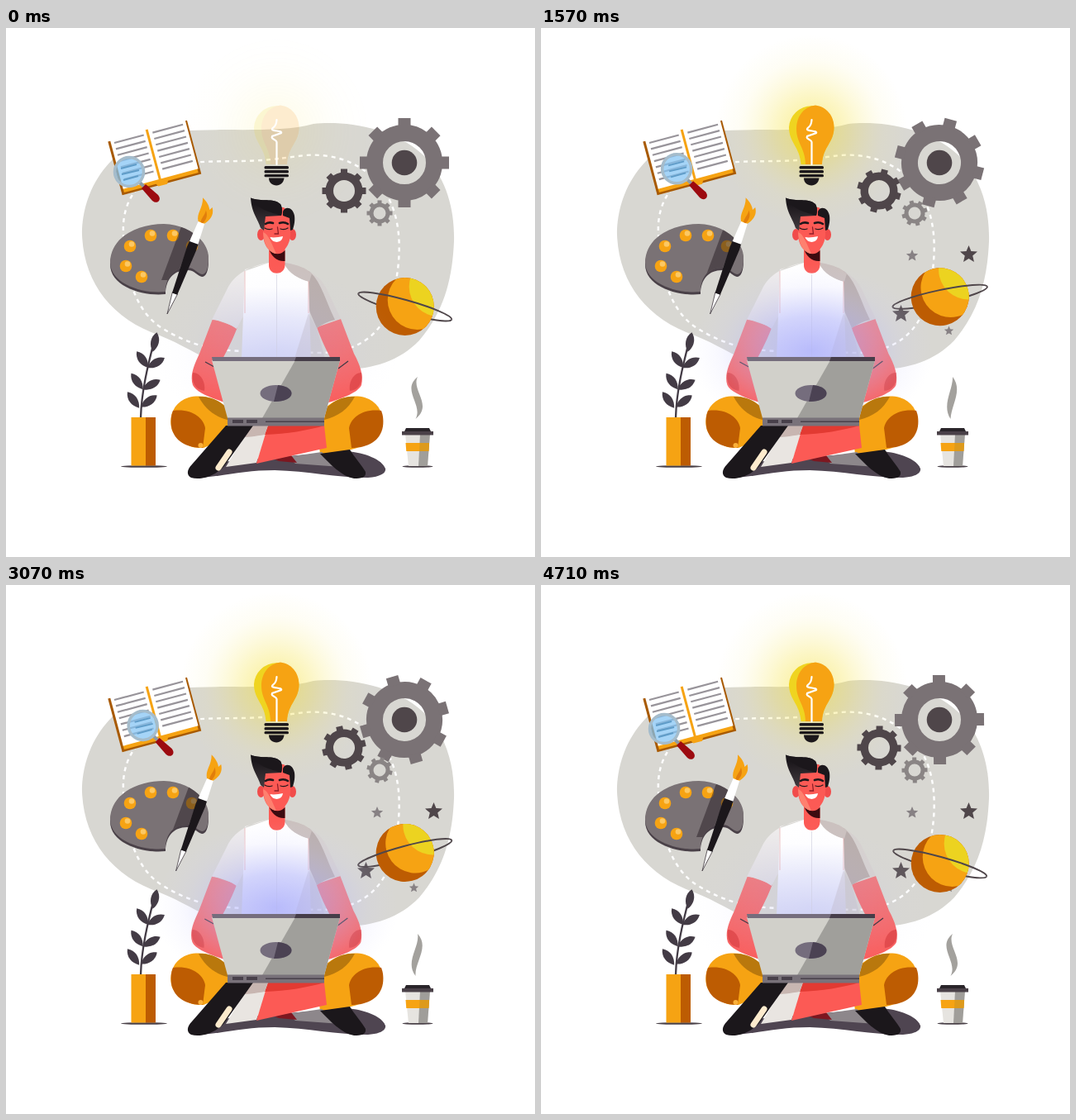
These frames come from a looping animation (640 by 640 pixels, 4.78 s). An HTML page:

```html
<!DOCTYPE html>
<html lang="en">
<head>
<meta charset="utf-8">
<title>Creative work</title>
<style>
html, body { margin: 0; width: 100%; height: 100%; overflow: hidden; background: #fff; }
svg { display: block; width: 100vw; height: 100vh; }
</style>
</head>
<body>
<svg viewBox="0 0 640 640">
<defs>
  <radialGradient id="warm">
    <stop offset="0" stop-color="#f5df2e" stop-opacity=".54"/>
    <stop offset=".4" stop-color="#f5e13c" stop-opacity=".27"/>
    <stop offset=".75" stop-color="#f8ea80" stop-opacity=".08"/>
    <stop offset="1" stop-color="#f8ea80" stop-opacity="0"/>
  </radialGradient>
  <radialGradient id="cool">
    <stop offset="0" stop-color="#a2a5ff" stop-opacity=".62"/>
    <stop offset=".4" stop-color="#b0b3ff" stop-opacity=".45"/>
    <stop offset=".75" stop-color="#c8c8fc" stop-opacity=".13"/>
    <stop offset="1" stop-color="#d8d8ff" stop-opacity="0"/>
  </radialGradient>
  <linearGradient id="shirt" x1="0" y1="0" x2="0" y2="1">
    <stop offset=".25" stop-color="#fff"/>
    <stop offset="1" stop-color="#d9dbf4"/>
  </linearGradient>
  <linearGradient id="sleeve" x1="0" y1="0" x2="0" y2="1">
    <stop offset="0" stop-color="#f2efee"/>
    <stop offset="1" stop-color="#dddbe0"/>
  </linearGradient>
  <linearGradient id="skin" x1="0" y1="0" x2="0" y2="1">
    <stop offset="0" stop-color="#ef7a7d"/>
    <stop offset="1" stop-color="#fb5a58"/>
  </linearGradient>
  <linearGradient id="quiff" x1="0" y1="0" x2="0" y2="1">
    <stop offset=".2" stop-color="#1b171b"/>
    <stop offset="1" stop-color="#423b40"/>
  </linearGradient>
  <clipPath id="paletteClip"><path d="M126 283C127 252 160 237 191 237C223 238 246 259 245 279C245 291 242 298 237 298C231 297 229 290 219 290C203 290 193 301 193 319C166 322 126 310 126 283Z"/></clipPath>
  <clipPath id="planetClip"><circle r="35"/></clipPath>
</defs>

<path fill="#d8d7d2" d="M92 250C92 190 132 132 205 125C265 120 328 128 372 116C410 112 468 120 504 153C534 181 543 222 542 258C540 306 529 344 500 378C472 407 432 416 392 412L290 414C246 408 222 386 186 372C128 352 94 308 92 250Z"/>
<path fill="none" stroke="#fff" stroke-width="2.400" stroke-dasharray="5 5" d="M330 158C285 164 240 158 208 166C158 178 140 212 142 248C144 300 157 342 187 362C222 384 250 390 290 391L382 393C424 392 453 372 464 338C474 305 480 266 472 231C460 179 415 150 362 154Z"/>

<g id="lamp">
  <circle cx="327" cy="124" r="116" fill="url(#warm)"/>
  <path fill="#efd420" d="M300 120A27.300 27.300 0 0 1 354.500 120C354.500 139 341 143 340 165H314.500C313 143 300 139 300 120Z"/>
  <path fill="#f6a313" d="M332 93.500C345 95 354.500 106 354.500 120C354.500 139 341 143 340 165H320C320 146 309 139 309 122C309 107 318 95 332 93.500Z"/>
</g>
<path fill="none" stroke="#fff" stroke-width="2.200" stroke-linecap="round" d="M327.500 165V138C327 134 320 135 322 131L333 127C335 124 321 125 322 122C323 119 327 121 327.500 111"/>
<g fill="#1c181b">
  <rect x="312.500" y="167" width="29.500" height="3.500" rx="1.500"/>
  <rect x="312.500" y="172" width="29.500" height="3.500" rx="1.500"/>
  <rect x="312.500" y="177" width="29.500" height="3.200" rx="1.500"/>
  <path d="M318 181.500H336.500C336 187 332 190.500 327.300 190.500C322 190.500 318 187 318 181.500Z"/>
</g>

<g id="gears"></g>

<g transform="translate(125 136) rotate(-15)">
  <path fill="#a85a02" d="M-2 1H97V68H-2Z"/>
  <path fill="#f6a313" d="M1 60H94V65.500H56L54 69H43L41 65.500H1Z"/>
  <path fill="#fff" d="M1 0H95V61H1Z"/>
  <path fill="#f6a313" d="M45.500 -1H48.500V62H45.500Z"/>
  <g id="lines" stroke="#98949a" stroke-width="2.200"></g>
</g>
<g id="lens">
  <path stroke="#8c9aa5" stroke-width="4" d="M13 13L18 18"/>
  <path fill="#9c0a10" d="M15 20L20 15L35 28C40 34 34 40 28 35Z"/>
  <circle r="17.500" fill="#83c4f4" fill-opacity=".72" stroke="#a5bccb" stroke-width="3.500"/>
  <path stroke="#5f9cc8" stroke-width="1.900" d="M-10 -4L9 -9M-9 3L12 -2M-7 10L11 5"/>
</g>

<path fill="#4a4148" transform="translate(0 3)" d="M126 283C127 252 160 237 191 237C223 238 246 259 245 279C245 291 242 298 237 298C231 297 229 290 219 290C203 290 193 301 193 319C166 322 126 310 126 283Z"/>
<g clip-path="url(#paletteClip)">
  <path fill="#7a7275" d="M120 230H250V330H120Z"/>
  <g id="paint"></g>
  <path id="shade" fill="#2b2128" fill-opacity=".52" d="M214 235H231L205 305H188Z"/>
</g>
<g id="brush">
  <g transform="translate(195 346) rotate(20.500)">
    <path fill="#fff" stroke="#3a3339" stroke-width=".7" d="M0 0L-3.300 -27H3.300Z"/>
    <path fill="#1b171b" d="M-3.300 -26L-6 -85L-5.500 -93H5.500L6 -85L3.300 -26Z"/>
    <path fill="#fff" d="M-5.500 -92L-4 -119H4L5.500 -92Z"/>
    <path fill="#f6a313" d="M-4 -118C-10 -127 -4 -135 -9 -147C-2 -144 2 -140 4 -136L6 -140C12 -131 8 -124 4 -118Z"/>
    <path fill="#e17e0c" d="M-1 -118C-2 -124 1 -128 0 -134C5 -128 4 -123 2 -118Z"/>
  </g>
</g>

<g id="stars"></g>
<g id="planet">
  <path class="ring" fill="none" stroke="#4f464a" stroke-width="2" d="M-58.500 0A58.500 8 0 0 0 58.500 0"/>
  <g id="globe" clip-path="url(#planetClip)">
    <circle r="36" fill="#bd5c02"/>
    <circle cx="15" cy="-8" r="36" fill="#f6a313"/>
    <circle cx="41" cy="-24" r="36" fill="#ecd320"/>
  </g>
  <path class="ring" fill="none" stroke="#4f464a" stroke-width="2" d="M-58.500 0A58.500 8 0 0 1 58.500 0"/>
</g>

<ellipse cx="167" cy="530.500" rx="28" ry="1.300" fill="#4a4148"/>
<path fill="#f6a313" d="M151.500 471H169V529.500H151.500Z"/>
<path fill="#bd5c02" d="M169 471H181V529.500H169Z"/>
<path fill="none" stroke="#433b45" stroke-width="2.300" d="M163 471C164 440 171 410 180 376"/>
<g id="leaves" fill="#433b45"></g>

<path id="steam" fill="#a3a19d"/>
<ellipse cx="498" cy="530.500" rx="18.500" ry="1.300" fill="#4a4148"/>
<path fill="#e6e4e0" d="M483 491H513L510 530H487Z"/>
<path fill="#a09e9a" d="M501 491H513L510 530H499Z"/>
<path fill="#f6a313" d="M483.500 502H512L511.300 512H484.300Z"/>
<path fill="#dd9a1c" d="M500.500 502H512L511.300 512H500Z"/>
<path fill="#2a252a" d="M484 484H512L514 488H482Z"/>
<path fill="#4a4148" d="M479 488H517V492.500H479Z"/>

<path fill="#4f4551" d="M230 545C270 541 290 535 325 535C365 536 400 544 438 544C454 543 460 538 459 533C455 522 435 514 412 512L260 525Z"/>
<g id="arms">
  <path fill="url(#skin)" d="M250 352L280 362C272 383 263 398 256 412L270 442L268 454C249 448 230 441 226 432C222 420 228 407 234 394Z"/>
  <path fill="url(#skin)" d="M405 352L376 362C383 382 392 398 399 412L386 442L388 454C407 448 426 441 430 432C433 420 428 407 421 394Z"/>
  <path fill="#e34748" d="M226 417C234 416 242 427 240 439C231 438 224 431 226 417ZM430 417C422 416 414 427 416 439C426 438 432 431 430 417Z"/>
  <path fill="none" stroke="#3a3038" stroke-width="1.300" d="M241 404L252 410M414 403L402 412"/>
</g>
<path fill="url(#sleeve)" d="M318 284C293 288 276 299 268 315L249 353C259 353 271 358 279 364L289 345V292Z"/>
<path fill="#d6d1cf" d="M337 284C360 287 380 300 387 314L405 352C395 353 384 357 376 363L365 340Z"/>
<path fill="#b9aeac" d="M366 294C380 304 386 328 398 353C389 355 382 359 376 363L366 340Z"/>
<path fill="url(#shirt)" d="M318 284H336C342 297 355 304 366 306L369 400H285L289 294Z"/>
<path fill="#cbc1bf" d="M337 284C352 286 362 290 370 297L367 307C355 304 342 297 336 284Z"/>
<path fill="none" stroke="#e6a9a9" stroke-width=".7" d="M289 294V345M366 306V345"/>
<path fill="none" stroke="#d9d8e4" stroke-width=".8" d="M327.500 298V398"/>
<path fill="#c9c3cc" fill-opacity=".5" d="M366 345L376 363L386 400H349Z"/>

<path fill="#fc5a55" d="M318 265H337.500V287C337 300 318 300 318 287Z"/>
<path fill="#3c0b10" d="M318 267C324 275 332 275 337.500 269V282C329 283 321 277 318 267Z"/>
<ellipse cx="308.500" cy="250" rx="4.500" ry="7" fill="#f14c4b"/>
<ellipse cx="346.500" cy="250" rx="4.500" ry="7" fill="#f14c4b"/>
<path fill="#fc5a55" d="M310 225L331 217H336L345 225L344 251C343 265 334 273 327 273C319 272 312 264 311 251Z"/>
<path fill="#ff8d78" fill-opacity=".75" d="M311 247C317 249 320 258 327 273C319 272 312 264 311 247Z"/>
<path fill="url(#quiff)" d="M296 205.500C309 211 323 205 332 213C335 218 334 224 333 227L314 228L312 245L308 242C305 231 297 224 296 205.500Z"/>
<path fill="#1b171b" d="M296 205.500C309 211 323 205 332 213C335 218 334 224 333 227C321 223 306 221 296 205.500ZM335 222C338 215 347 217 349 227C350 235 348 240 347 244L344 245L343 230L335 227Z"/>
<g fill="none" stroke="#1f171b" stroke-linecap="round">
  <path stroke-width="2.600" d="M314 237C317 235 320 235 323 236M331 236C334 235 338 235 341 237"/>
  <path stroke-width="1.300" d="M313 242C316 244 319 244 322 243M332 243C335 244 338 244 341 242"/>
  <path stroke="#8f1e28" stroke-width="1.300" d="M328.500 241L329.500 249H325"/>
</g>
<path fill="#fff" d="M319.500 253C324 254 330 253 335 252C334 261 322 261 319.500 253Z"/>
<ellipse id="lapGlow" cx="327" cy="390" rx="148" ry="104" fill="url(#cool)"/>

<path fill="#f6a313" d="M268 460C254 447 236 443 221 447C202 453 196 471 201 487C209 503 225 509 239 508L300 482Z"/>
<path fill="#bd5c02" d="M202 463C225 460 239 472 241 484L238 508C219 508 203 500 200 482C199 474 200 468 202 463Z"/>
<path fill="#b9780d" d="M233 446C249 445 259 452 268 460V474C252 470 241 461 233 446Z"/>
<path fill="#f6a313" d="M386 460C400 447 419 443 434 447C453 453 459 471 454 487C445 505 414 514 380 515L376 482Z"/>
<path fill="#bd5c02" d="M454 463C431 460 417 472 415 484L418 508C437 508 453 500 456 482C457 474 456 468 454 463Z"/>
<path fill="#b9780d" d="M422 446C406 445 396 452 387 460L385 474C402 470 414 461 422 446Z"/>
<circle cx="235.500" cy="505" r="3" fill="#fbb13a"/>
<path fill="#8d878b" d="M340 519L382 513L405 531L350 527Z"/>
<path fill="#7d1720" d="M325 522L345 517L352 526L330 524Z"/>
<path fill="#1b171b" d="M380 515L416 510C422 520 430 528 435 537C436 544 430 545 421 545C405 542 393 528 380 515Z"/>
<path fill="#e9e5e1" d="M296 481H319L303 526L266 531Z"/>
<path fill="#fc5a55" d="M317 481H385L388 508L303 527Z"/>
<path fill="#e23a32" d="M317 481H385C365 487 340 491 313 492Z"/>
<path fill="#c8b6b1" d="M293 481H317L313 492C302 494 290 495 281 496Z"/>
<path fill="#1b171b" d="M266 481H299L264 530C252 543 235 547 224 544C217 540 220 533 225 528Z"/>
<path stroke="#fdebcd" stroke-width="7" stroke-linecap="round" d="M270 513L257 532"/>

<path fill="#d1d0ca" d="M249 402H404L385 472H268Z"/>
<path fill="#a09f9b" d="M350 402H404L385 472H310Z"/>
<ellipse cx="326.500" cy="442" rx="19" ry="10" fill="#756d7d"/>
<path fill="#4b4253" d="M329 432C339 433 345.500 437 345.500 442C345.500 448 337 452 324 452Z"/>
<path fill="#756d7d" d="M249 398H404V403H250Z"/>
<path fill="#463d49" d="M351 398H404V403H349Z"/>
<path fill="#79727a" d="M268 471.500H385V481.500H268Z"/>
<path fill="#48404a" d="M274 474H287V478H274ZM291 474H304V478H291ZM314 475.500H385V477H314Z"/>
</svg>

<script>
const LOOP = 4780;
const $ = id => document.getElementById(id);
const range = (n, f) => Array.from({ length: n }, (_, i) => f(i)).join('');

const gears = [
  { x: 482, y: 163, body: 46, hole: 26, tip: 54, w: 15, color: '#7a7275', turn: 45 },
  { x: 409, y: 197, body: 22.5, hole: 13, tip: 26.5, w: 8, color: '#4f464a', turn: -90 },
  { x: 452, y: 224, body: 12.5, hole: 7.5, tip: 15.5, w: 5, color: '#8a8585', turn: 90 }
];
$('gears').innerHTML = gears.map(g => `<g fill="${g.color}">
  <circle r="${(g.body + g.hole) / 2}" fill="none" stroke="${g.color}" stroke-width="${g.body - g.hole}"/>
  ${range(8, i => `<rect x="${-g.w / 2}" y="${-g.tip}" width="${g.w}" height="${g.tip - g.body + 3}" transform="rotate(${i * 45})"/>`)}
  </g>`).join('') + '<circle cx="482" cy="163" r="15.300" fill="#4f464a"/>';

$('lines').innerHTML = range(7, i => {
  const y = 4.5 + i * 7.6;
  return `<path d="M5 ${y}H42M53 ${y}H91"/>`;
});

const dots = [[150, 264], [175, 251], [202, 251], [225, 264], [145, 288], [164, 301]];
$('paint').innerHTML = dots.map(([x, y]) =>
  `<circle cx="${x}" cy="${y}" r="7.300" fill="#f6a313"/>
   <circle cx="${x + 2}" cy="${y - 2.5}" r="3.300" fill="#fcc863"/>`).join('');

const leaves = [[180, 380, 12], [165, 401, -35], [158.5, 427.5, -36], [154, 450, -36], [181.5, 405, 60], [176, 431.5, 62], [173, 451.5, 54]];
$('leaves').innerHTML = leaves.map(([x, y, a]) =>
  `<path transform="translate(${x} ${y}) rotate(${a})" d="M0 -12C7 -5 6 5 0 12C-6 5 -7 -5 0 -12Z"/>`).join('');

const stars = [
  { x: 517.5, y: 274, r: 11, color: '#4f464a', at: 70 },
  { x: 435.5, y: 346, r: 11, color: '#5c5458', at: 180 },
  { x: 449, y: 275.5, r: 7.5, color: '#878184', at: 450 },
  { x: 493.5, y: 366.5, r: 6, color: '#878184', at: 680 }
];
const starPath = r => 'M' + Array.from({ length: 10 }, (_, i) => {
  const a = i * Math.PI / 5, d = i % 2 ? r * 0.45 : r;
  return `${(d * Math.sin(a)).toFixed(2)} ${(-d * Math.cos(a)).toFixed(2)}`;
}).join('L') + 'Z';
$('stars').innerHTML = stars.map(s => `<path fill="${s.color}" d="${starPath(s.r)}"/>`).join('');

const gearEls = $('gears').children, starEls = $('stars').children;
const rings = document.querySelectorAll('.ring');
const move = (el, x, y, rest = '') => el.setAttribute('transform', `translate(${x} ${y}) ${rest}`);
const pop = (t, at, span = 380) => {
  const p = Math.min(1, Math.max(0, (t - at) / span));
  return p * p * (3 - 2 * p);
};

function draw(t) {
  const sway = (1 - Math.cos(t / LOOP * 2 * Math.PI)) / 2;
  gears.forEach((g, i) => move(gearEls[i], g.x, g.y, `rotate(${g.turn * t / LOOP})`));
  stars.forEach((s, i) => move(starEls[i], s.x, s.y, `scale(${pop(t, s.at)})`));

  move($('lens'), 149 + 20.5 * sway, 174 - 5 * sway);
  move($('brush'), 13 * sway, 0);
  move($('shade'), 13 * sway, 0);
  move($('arms'), -0.8 * sway, 0);
  move($('planet'), 482.7, 337 - 16 * sway);
  move($('globe'), 0, 0, `rotate(${-18 * sway})`);
  rings.forEach(r => r.setAttribute('transform', `rotate(${15.5 - 37.5 * sway})`));

  // The steam bends from an S to its mirror image.
  const bend = 14 * (1 - 2 * sway);
  $('steam').setAttribute('d', `M498 422C${492 - bend} 438 ${491 + bend} 456 495.5 473
    C${503 + bend} 456 ${504 - bend} 438 498 422Z`);

  $('lamp').setAttribute('opacity', t % (LOOP / 3) < 635 ? 0.2 : 1);
  const lap = t % (LOOP / 4);
  $('lapGlow').setAttribute('opacity', lap >= 70 && lap < 700 ? 1 : 0.25);
}

const start = performance.now();
function tick() {
  draw((performance.now() - start) % LOOP);
  requestAnimationFrame(tick);
}
tick();
</script>
</body>
</html>
```
